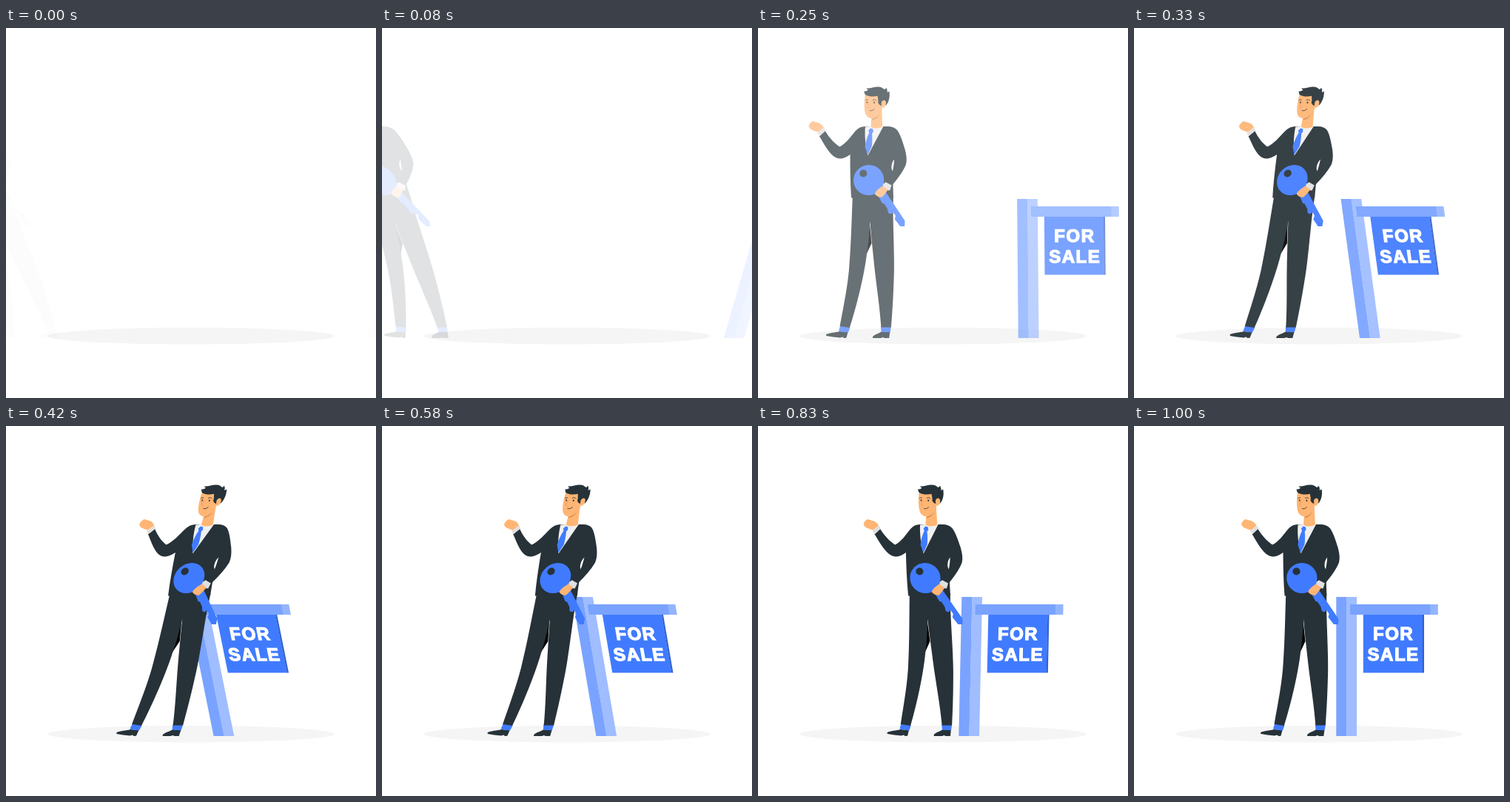
Write an HTML page with a canvas that moves like this. It is 500 px wide and 500 px high and loops after 1040 ms.

```html
<!DOCTYPE html>
<html lang="en">
<head>
<meta charset="utf-8">
<title>For sale</title>
<style>
html, body { margin: 0; width: 100%; height: 100%; overflow: hidden; background: #fff; }
canvas { display: block; width: 500px; height: 500px; }
</style>
</head>
<body>
<canvas id="stage" width="500" height="500"></canvas>
<script>
const SIZE = 500, LOOP = 1040, FPS = 24, LEAD = 33.3;
const BLUE = '#407BFF', DARK = '#263238', SKIN = '#FFB573', CUFF = '#E0E0E0';
const ctx = document.getElementById('stage').getContext('2d');
const layer = document.createElement('canvas');
layer.width = layer.height = SIZE;
const pen = layer.getContext('2d');

const shape = (color, d) => ({ color, path: new Path2D(d) });
const line = (color, width, d) => ({ color, width, path: new Path2D(d) });

const post = [
  shape('#79A3FF', 'M273.3 231H287.5V419H273.3Z'),
  shape('#9FBDFF', 'M287.3 231H301V419H287.3Z'),
  shape('#79A3FF', 'M292 241H401V255H292Z'),
  shape('#93B5FF', 'M400.5 241H410.8V255H400.5Z'),
  shape(BLUE, 'M309.8 255H390V333.5H309.8Z'),
  shape('#3362CC', 'M389.8 255H392V333.5H389.8Z')
];

const man = [
  // shoes and socks
  shape(DARK, 'M171 414.2C176 411.5 183 412 189 410L200.5 411L198.5 418.8L195 418.9L193.5 417.5L190 418.6C184 418 177 417 171.3 416Z'),
  shape(DARK, 'M234 417.2C238 413 243 413 246 410H257.5L256.3 419H250L248 418L245 419H234.3Z'),
  shape(BLUE, 'M190 402.5L203.5 404.5L200.8 411.8L188 409.5Z'),
  shape(BLUE, 'M244.8 403.5H258.8L257.6 411.3L245.6 410.8Z'),
  // trousers
  shape('#000', 'M228 258L224 307L231.5 291Z'),
  shape(DARK, 'M205.3 226H260.2V252C261 285 263.2 322 261.8 345C261.2 368 260 388 258.8 404.5H245.3C243.5 378 238 345 235 318C233.5 303 231.5 288 229 261C228.2 280 227 294 225 306C222 334 211.5 378 202.8 405L189.5 403C195 372 200.5 345 201.8 318C203.8 290 204.3 255 205.3 226Z'),
  // jacket
  shape(DARK, 'M221.5 133C216 133 212 135 208.5 139C201 148 196 156 187 160.5C179 155 173 148 167.3 139L159.5 146C165 155 170 164 175.5 170C183 178 190 179 201.5 171C201.6 190 202 211 203.5 229.5H260.4C260.2 222 259.8 216 259.8 211C267 202 273.2 194 276.8 185C278.8 178 277.3 171 275.5 164C272.3 154 269.3 144 264.8 138C261 134 256 132.5 250 133Z'),
  shape('#FFF', 'M261.2 177.5C260.8 183 260 189 259 193.5C256.5 190 257 182.5 261.2 177.5Z'),
  // shirt and tie
  shape('#F0F0F0', 'M221.5 133.5L228.5 133L246 133L225.3 172.5C222.3 160 220.5 147 221.5 133.5Z'),
  shape(BLUE, 'M228.6 135.5L232 136.5L232.6 140.3L230.7 142.5C231.5 149 231 156 230.6 160L225.2 171.5L221.4 160.5C222.6 153 224.3 147 227 141.8L226 138.5Z'),
  // head
  shape(SKIN, 'M230 118L229 133.3C232 136.5 240 136 244.8 133.3L243.5 104L230 104Z'),
  shape('#D88F50', 'M232 121.8C235.5 121.2 238.5 119 240.5 115.5C239.8 120 236 123.5 230 124.6Z'),
  shape(SKIN, 'M221 90C219.7 99 219.7 109 221.3 115C223 121 229 123.4 234 121.4C240 119 243.5 112 245 104C247 97 244 89 239 88Z'),
  shape(DARK, 'M219.5 85.2C222 86 223.5 85 225 83.2C223.7 83 223 82.2 222.5 81.4C229 82 233 79 239 79.5C242 79.7 245 81 247 83C248.6 82.6 249 81.5 249 80.5C250.7 82.3 251.3 84.5 250.7 86.7C252.2 86.6 253.1 86 253.6 85.2C254.5 91 254.4 98 249.6 104.2C246.7 105 244.7 105 242.6 104.8C241 104.4 239.8 103 238.6 101C239.3 97 238 94.5 237.8 91.8C233 93.2 226 92.8 221.4 90.3C220.4 89 219.7 87 219.5 85.2Z'),
  shape(SKIN, 'M243 102.6C242.8 99.5 244.6 97.3 246.8 97.6C249 98 249.8 100.6 249.2 103.2C248.6 106 246.8 108 244.8 107.8C243.3 107.6 242.6 106 243.4 104.6Z'),
  line('#EB996E', 0.9, 'M226.2 100.5C225 103 223.8 105.5 223.7 107C224.4 107.7 225.5 107.8 226.3 107.5'),
  line(DARK, 0.8, 'M227.4 111.6C229.6 112.3 232 111.6 233.5 109.6M231.3 97.4C233 96.2 235 96.7 236.2 98M221.4 97.8C222.2 96.8 223.4 96.6 224.6 97'),
  shape(DARK, 'M232.4 100.8a.95 1.3 0 1 0 1.9 0a.95 1.3 0 1 0 -1.9 0M222.8 100.4a.85 1.2 0 1 0 1.7 0a.85 1.2 0 1 0 -1.7 0'),
  // raised hand
  shape(SKIN, 'M145.2 132C146.2 129 148.5 126.5 150.5 125.9L158.5 128.2C161.5 129.5 164 131.5 165.5 134.5L158.5 140.8C155 139.8 151.5 138.8 148.7 137.2C146.8 136 145 134.2 145.2 132Z'),
  shape(CUFF, 'M165.6 134.2L168.3 138.6L160.3 146L156.6 141.8Z'),
  // key
  shape(BLUE, 'M206.3 205.5a20.6 20.6 0 1 0 41.2 0a20.6 20.6 0 1 0 -41.2 0'),
  shape(DARK, 'M214.4 196.5a5.1 5.1 0 1 0 10.2 0a5.1 5.1 0 1 0 -10.2 0'),
  shape(BLUE, 'M237 222L245.5 215L276.2 260.5L276 268H270L262.5 258.5L263.6 253.7L260 248.8L257.4 251.4L253.7 250L252.4 244.2L248 237.4L245.5 237Z'),
  // lower hand
  shape(CUFF, 'M246.4 211L249.8 208.3L257.8 212.5L255.6 219.4L251.5 219.2L246 214.5Z'),
  shape(SKIN, 'M245.8 213.3L252.7 218.2C251.5 221.5 248.5 225 245 228.8C241.5 229 237.5 227.3 235.3 224.4C236 220.5 241 217 245.8 213.3Z')
];

function paint(shapes) {
  for (const s of shapes) {
    pen.fillStyle = pen.strokeStyle = s.color;
    if (s.width) {
      pen.lineWidth = s.width;
      pen.lineCap = 'round';
      pen.stroke(s.path);
    } else pen.fill(s.path);
  }
}

// Bold text thickened by an outline.
function label(text, y) {
  pen.fillStyle = pen.strokeStyle = '#FFF';
  pen.font = 'bold 24px "Liberation Sans", Arial, sans-serif';
  pen.textAlign = 'center';
  pen.letterSpacing = '1.5px';
  pen.lineWidth = 1.3;
  pen.lineJoin = 'miter';
  pen.miterLimit = 3;
  pen.fillText(text, 350.6, y);
  pen.strokeText(text, 350.6, y);
}

const mix = (a, b, p) => a + (b - a) * p;
const bezier = (a, b, u) => 3 * a * u * (1 - u) ** 2 + 3 * b * u * u * (1 - u) + u ** 3;

// cubic-bezier(.36, -.01, .5, 1.38)
function ease(x) {
  let lo = 0, hi = 1;
  for (let i = 0; i < 24; i++) {
    const mid = (lo + hi) / 2;
    if (bezier(0.36, 0.5, mid) < x) lo = mid; else hi = mid;
  }
  return bezier(-0.01, 1.38, lo);
}

const slope = deg => Math.tan(deg * Math.PI / 180);

// Entry from the side: slide with skew, lean over, settle.
function pose(ms) {
  if (ms < 600) {
    const p = ease(ms / 600);
    return { shift: 250 * (1 - p), skew: mix(slope(-20), slope(10), p), alpha: Math.max(0, Math.min(1, p)) };
  }
  let skew = 0;
  if (ms < 800) skew = mix(slope(10), slope(-2), ease((ms - 600) / 200));
  else if (ms < 1000) skew = mix(slope(-2), 0, ease((ms - 800) / 200));
  return { shift: 0, skew, alpha: 1 };
}

function group(p, side, cy, draw) {
  pen.setTransform(1, 0, 0, 1, 0, 0);
  pen.clearRect(0, 0, SIZE, SIZE);
  const k = side * p.skew;
  pen.setTransform(1, 0, k, 1, side * p.shift - k * cy, 0);
  draw();
  ctx.globalAlpha = p.alpha;
  ctx.drawImage(layer, 0, 0);
  ctx.globalAlpha = 1;
}

function drawSign() {
  paint(post);
  label('FOR', 288.5);
  label('SALE', 317);
}

// Steps at 24 per second on a 10 ms clock; the first pose is held for two.
function clock(t) {
  const step = Math.floor((Math.floor(t / 10) * 10 + 4.9) * FPS / 1000);
  return (step < 2 ? 0 : step * 1000 / FPS) + LEAD;
}

function render(t) {
  const p = pose(clock(t));
  ctx.fillStyle = '#FFF';
  ctx.fillRect(0, 0, SIZE, SIZE);
  ctx.fillStyle = '#F5F5F5';
  ctx.beginPath();
  ctx.ellipse(250, 416.2, 193.9, 11.3, 0, 0, Math.PI * 2);
  ctx.fill();
  group(p, 1, 325, drawSign);
  group(p, -1, 249, () => paint(man));
}

const start = performance.now();
function tick() {
  render((performance.now() - start) % LOOP);
  requestAnimationFrame(tick);
}
tick();
</script>
</body>
</html>
```
